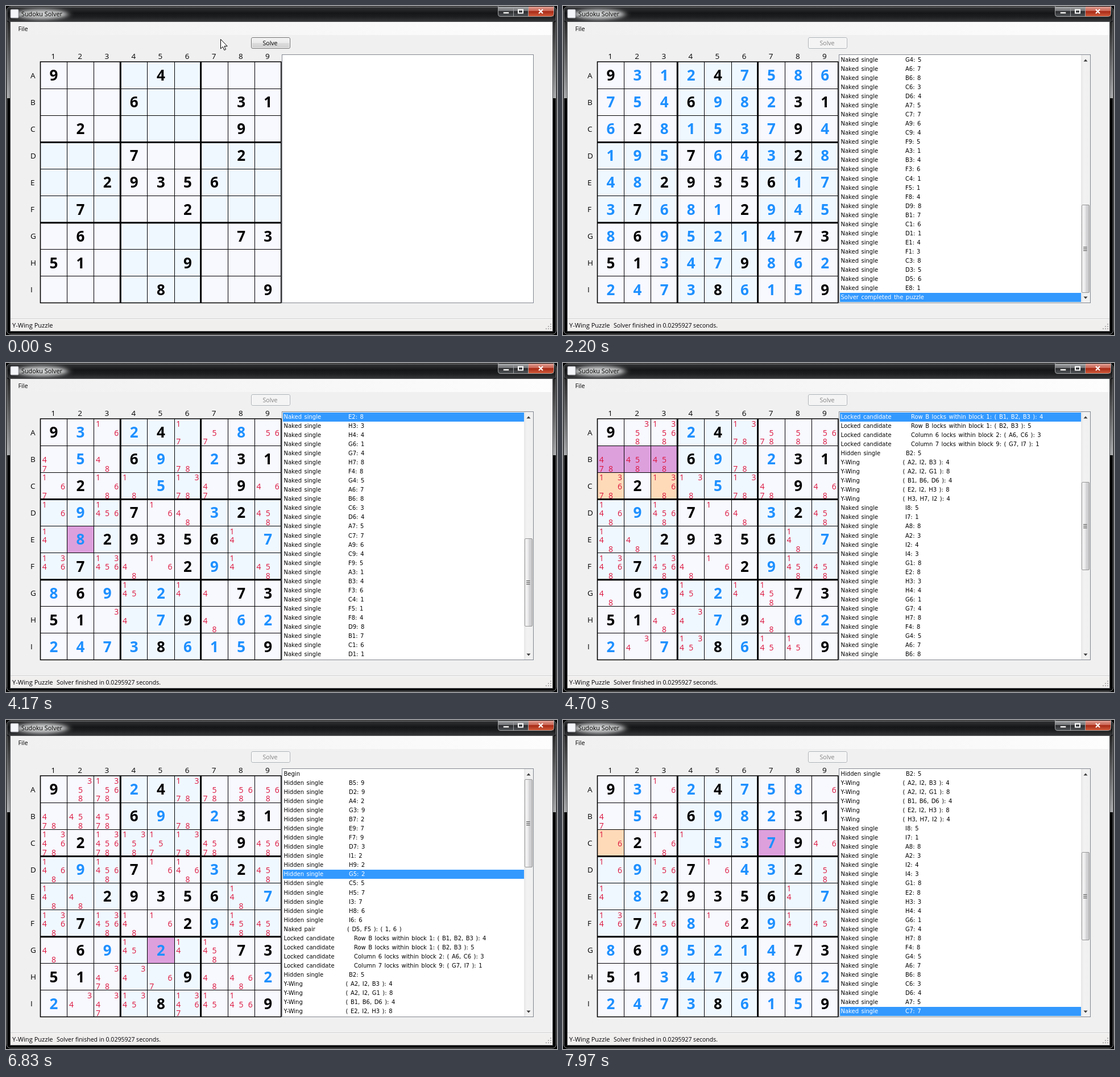
Write an HTML page that moves like this. It is 969x578 px and loops after 8 s.

```html
<!DOCTYPE html>
<html lang="en">
<head>
<meta charset="utf-8">
<title>Sudoku Solver</title>
<style>
html, body { margin: 0; width: 100%; height: 100%; overflow: hidden; background: #000; }
svg { display: block; width: 969px; height: 578px; }
text { font-family: "Open Sans", "Noto Sans", sans-serif; white-space: pre; }
.label { font-size: 13.5px; }
.big { font-size: 26px; font-weight: 700; text-anchor: middle; }
.small { font-size: 14px; fill: #dc143c; text-anchor: middle; }
.log { font: 10px "DejaVu Sans", sans-serif; word-spacing: 1.3px; }
</style>
</head>
<body>
<svg viewBox="0 0 969 578">
  <defs>
    <linearGradient id="bar" x2="0" y2="1">
      <stop offset="0" stop-color="#333436"/><stop offset=".4" stop-color="#151617"/>
      <stop offset=".65" stop-color="#1d1e1f"/><stop offset="1" stop-color="#3a3b3d"/>
    </linearGradient>
    <linearGradient id="side" x2="0" y2="1">
      <stop offset="0" stop-color="#2a2a2b"/><stop offset="1" stop-color="#a8a9aa"/>
    </linearGradient>
    <linearGradient id="menu">
      <stop offset="0" stop-color="#f0f0f0"/><stop offset="1" stop-color="#fdfdfd"/>
    </linearGradient>
    <linearGradient id="cap" x2="0" y2="1">
      <stop offset="0" stop-color="#a9abad"/><stop offset=".48" stop-color="#6b6d70"/>
      <stop offset=".5" stop-color="#2a2c2e"/><stop offset="1" stop-color="#505356"/>
    </linearGradient>
    <linearGradient id="close" x2="0" y2="1">
      <stop offset="0" stop-color="#e0a297"/><stop offset=".48" stop-color="#c9604f"/>
      <stop offset=".5" stop-color="#a82a16"/><stop offset="1" stop-color="#cf5a3a"/>
    </linearGradient>
    <linearGradient id="thumb">
      <stop offset="0" stop-color="#f6f6f6"/><stop offset=".48" stop-color="#e9e9eb"/>
      <stop offset=".52" stop-color="#d8d8da"/><stop offset="1" stop-color="#c6c6c9"/>
    </linearGradient>
    <linearGradient id="track">
      <stop offset="0" stop-color="#e6e6e6"/><stop offset=".3" stop-color="#f2f2f2"/><stop offset="1" stop-color="#f0f0f0"/>
    </linearGradient>
    <filter id="soft" x="-30%" y="-100%" width="160%" height="300%"><feGaussianBlur stdDeviation="6 3"/></filter>
    <clipPath id="title"><rect x="2" y="2" width="965" height="25"/></clipPath>
  </defs>
  <g id="frame"></g>
  <g id="cells"></g>
  <g id="grid"></g>
  <g id="list"></g>
  <g id="button"></g>
  <path id="cursor" d="M0 0V16.5L3.8 13 6.4 19 9 17.9 6.5 12.1H11.7Z" fill="#fff" stroke="#000"/>
</svg>
<script>
const $ = id => document.getElementById(id);
const LOOP = 8000, REPEAT = 30.8, ROWS = 27, ROW_H = 16.04;
const X0 = 60.5, Y0 = 98, CELL = 47.1;

const rect = (x, y, w, h, fill, extra = '') =>
  `<rect x="${x}" y="${y}" width="${w}" height="${h}" fill="${fill}" ${extra}/>`;
const text = (x, y, str, extra = '') => `<text x="${x}" y="${y}" ${extra}>${str}</text>`;
const path = (d, stroke, width = 1, extra = '') =>
  `<path d="${d}" fill="none" stroke="${stroke}" stroke-width="${width}" ${extra}/>`;

// ---- solver log -------------------------------------------------------
const singles = (kind, x, list) =>
  list.split(' ').map(s => ({ kind, x, note: `${s.slice(0, 2)}: ${s[2]}`, fills: true }));
const hidden = list => singles('Hidden single', 603, list);
const lock = (line, block, cells, digit) => ({
  kind: 'Locked candidate', x: 612,
  note: `${line} locks within block ${block}: ( ${cells} ): ${digit}`
});
const wing = (cells, digit) => ({ kind: 'Y-Wing', x: 597.5, note: `( ${cells} ): ${digit}` });

const steps = [
  { kind: 'Begin' },
  ...hidden('B59 D29 A42 G39 B72 E97 F79 D73 I12 H92 G52 C55 H57 I37 H86 I66'),
  { kind: 'Naked pair', x: 600, note: '( D5, F5 ): ( 1, 6 )' },
  lock('Row B', 1, 'B1, B2, B3', 4),
  lock('Row B', 1, 'B2, B3', 5),
  lock('Column 6', 2, 'A6, C6', 3),
  lock('Column 7', 9, 'G7, I7', 1),
  ...hidden('B25'),
  wing('A2, I2, B3', 4),
  wing('A2, I2, G1', 8),
  wing('B1, B6, D6', 4),
  wing('E2, I2, H3', 8),
  wing('H3, H7, I2', 4),
  ...singles('Naked single', 602,
    'I85 I71 A88 A23 I24 I43 G18 E28 H33 H44 G61 G74 H78 F48 G45 A67 B68 C63 D64 A75 ' +
    'C77 A96 C94 F95 A31 B34 F36 C41 F51 F84 D98 B17 C16 D11 E14 F13 C38 D35 D56 E81'),
  { kind: 'Solver completed the puzzle' }
];

// ---- board states, one per log row -----------------------------------
const givens = ('9...4.......6...31.2.....9....7...2...29356..' +
  '.7...2....6.....7351...9.......8...9').split('').map(c => +c || 0);
const row = i => Math.floor(i / 9), col = i => i % 9;
const block = i => 3 * Math.floor(row(i) / 3) + Math.floor(col(i) / 3);
const sees = (a, b) => a !== b && (row(a) === row(b) || col(a) === col(b) || block(a) === block(b));
const all = givens.map((_, i) => i);

const states = [];
let values = givens;
let marks = all.map(i => [1, 2, 3, 4, 5, 6, 7, 8, 9].filter(d => !all.some(j => givens[j] === d && sees(i, j))));
for (const { note, fills } of steps) {
  let named = [], lost = [];
  if (note) {
    named = note.match(/[A-I]\d/g).map(s => (s.charCodeAt(0) - 65) * 9 + +s[1] - 1);
    const digits = note.split(': ').pop().match(/\d/g).map(Number);
    values = values.slice();
    if (fills) values[named[0]] = digits[0];
    const before = marks;
    marks = before.map((set, i) => set.filter(d => !(digits.includes(d) &&
      named.filter(n => before[n].includes(d)).every(n => sees(i, n)))));
    lost = all.filter(i => !values[i] && marks[i].length < before[i].length);
  }
  states.push({ values, marks, named, lost });
}

// ---- static parts -----------------------------------------------------
function drawFrame() {
  let s = rect(0, 0, 969, 578, '#000') +
    rect(1.5, 1.5, 966, 575, '#050506', 'rx="6" stroke="#8f9193"') +
    rect(2, 2, 965, 26, 'url(#bar)', 'rx="5"') +
    rect(2, 28, 5, 134, 'url(#side)') + rect(962, 28, 5, 134, 'url(#side)') +
    '<g clip-path="url(#title)"><ellipse cx="63" cy="14.5" rx="46" ry="9" fill="#c9cacb" filter="url(#soft)"/></g>' +
    rect(8, 6, 14, 15, '#f4f5f8', 'rx="1.5" stroke="#9a9da4"') +
    text(27, 18, 'Sudoku Solver', 'font-size="10.8"');

  s += rect(866, 1, 52, 17, 'url(#cap)') + rect(918, 1, 45, 17, 'url(#close)') +
    path('M865.5 0V14Q865.5 18.5 870 18.5H958Q963.5 18.5 963.5 13V0M892.5 1V18M918.5 1V18', '#a0a2a4') +
    rect(874.5, 10.5, 10, 3, '#fff', 'stroke="#444" stroke-width=".7"') +
    path('M901 6.5H909V12.5H901Z', '#fff', 2) +
    path('M937 6L944 13M944 6L937 13', '#fff', 2.2);

  s += rect(7.5, 27.5, 954, 544, '#f0f0f0', 'stroke="#4c4e50"') +
    rect(8, 28, 953, 23, 'url(#menu)') +
    text(21.5, 43.5, 'File', 'font-size="10.8"') +
    rect(8, 549, 953, 22, '#f1eeee') + path('M8 549.5H961', '#cdcdcd') + path('M8 550.5H961', '#fff') +
    text(11, 565, 'Y-Wing Puzzle', 'font-size="11.1"') +
    `<g id="done">${text(89, 565, 'Solver finished in 0.0295927 seconds.', 'font-size="10.5"')}</g>`;
  for (let r = 0; r < 3; r++)
    for (let c = 2 - r; c < 3; c++) s += rect(949 + 4 * c, 558 + 4 * r, 2, 2, '#b3b1b1');

  for (let i = 0; i < 9; i++) {
    s += text(X0 + CELL * (i + .5) - 1, 93, i + 1, 'class="label" text-anchor="middle"') +
      text(43, 126.5 + CELL * i, 'ABCDEFGHI'[i], 'class="label"');
  }
  $('frame').innerHTML = s + rect(485.5, 85.5, 442, 436, '#fff', 'stroke="#828790"');

  let thin = '', thick = '';
  const cross = (x, y) => `M${x} 98V521M60 ${y}H484`;
  for (let i = 1; i < 9; i++) {
    if (i % 3) thin += cross(Math.floor(X0 + CELL * i) + .5, Math.floor(Y0 + CELL * i) + .5);
    else thick += cross(60 + CELL * i, Y0 + CELL * i + .2);
  }
  $('grid').innerHTML = path(thin, '#000') + path(thick, '#000', 3) +
    path('M60.5 98H483.8V521.5H60.5Z', '#000', 1.6);
}

// ---- changing parts ---------------------------------------------------
function drawCells(k) {
  const state = k < 0 ? { values: givens, named: [], lost: [] } : states[k];
  let s = '';
  for (const i of all) {
    const x = X0 + CELL * col(i), y = Y0 + CELL * row(i);
    const fill = state.named.includes(i) ? '#dda0dd' : state.lost.includes(i) ? '#ffdab9'
      : block(i) % 2 ? '#f0f8ff' : '#f8f8ff';
    s += rect(x, y, CELL, CELL, fill, 'shape-rendering="crispEdges"');
    if (state.values[i]) {
      s += text(x + 23.4, y + 33, state.values[i], `class="big" fill="${givens[i] ? '#000' : '#1e90ff'}"`);
    } else if (state.marks) {
      for (const d of state.marks[i])
        s += text(x + 7.3 + 16.1 * ((d - 1) % 3), y + 14.2 + 15.6 * Math.floor((d - 1) / 3), d, 'class="small"');
    }
  }
  $('cells').innerHTML = s;
}

function drawList(k, top) {
  if (k < 0) return $('list').innerHTML = '';
  let s = '';
  for (let r = 0; r < ROWS; r++) {
    const { kind, x, note } = steps[top + r], y = Math.round(87 + ROW_H * r), on = top + r === k;
    const style = `class="log" fill="${on ? '#fff' : '#000'}"`;
    if (on) s += rect(487, y, 424, 16, '#3399ff');
    s += text(488.5, y + 11.3, kind, style);
    if (note) s += text(x, y + 11.3, note, style);
  }
  const y = 104.5 + Math.round(5.833 * top);
  s += rect(911, 86, 16, 435, 'url(#track)') +
    '<path d="M915.5 97.5L919 93.5 922.5 97.5ZM915.5 510.5L919 514.5 922.5 510.5Z" fill="#3c3c3c"/>' +
    rect(912.5, y, 13, 154, 'url(#thumb)', 'rx="1.5" stroke="#979797"');
  for (let i = -1; i < 2; i++) s += rect(915, y + 76.5 + 3 * i, 6.5, 1.3, '#666');
  $('list').innerHTML = s;
}

const looks = {
  normal: ['#707070', '#f2f2f2', '#ebebeb', '#dddddd', '#cfcfcf', '#000'],
  hover: ['#3c7fb1', '#eaf6fd', '#d9f0fc', '#bee6fd', '#a7d9f5', '#000'],
  pressed: ['#2c628b', '#e5f4fc', '#c4e5f6', '#98d1ef', '#68b3db', '#000'],
  fading: ['#8faabb', '#f0f5f8', '#e8f0f5', '#deeaf1', '#d6e5ed', '#666'],
  disabled: ['#adb2b5', '#f4f4f4', '#f4f4f4', '#f4f4f4', '#f4f4f4', '#838383']
};
function drawButton(look) {
  const [edge, a, b, c, d, ink] = looks[look];
  const stop = (at, color) => `<stop offset="${at}" stop-color="${color}"/>`;
  $('button').innerHTML =
    `<linearGradient id="face" x2="0" y2="1">${stop(0, a)}${stop(.5, b)}${stop(.5, c)}${stop(1, d)}</linearGradient>` +
    rect(431.5, 55.5, 68, 19, 'url(#face)', `rx="2.5" stroke="${edge}"`) +
    rect(432.5, 56.5, 66, 17, 'none', 'rx="1.5" stroke="#fff" stroke-opacity=".7"') +
    text(464.5, 69, 'Solve', `font-size="10.6" text-anchor="middle" fill="${ink}"`);
}

// ---- timeline -----------------------------------------------------------
function selected(t) {
  if (t < 1595) return -1;
  if (t < 2725) return 68;
  if (t < 3195) return 67;
  if (t < 6060) return Math.max(0, 66 - Math.floor((t - 3200) / REPEAT));
  if (t < 6560) return 1;
  return 2 + Math.floor((t - 6566.7) / REPEAT + .7);
}

function pointer(t) {
  if (t < 2095) {
    const p = Math.min(1, Math.max(0, (t - 633) / 567)), e = p * p * (3 - 2 * p);
    return [377 + 66 * e, 58 + 6.5 * e];
  }
  const n = Math.round((t - 2066.7) / 33.33);
  return n < 4 ? [443 + 24.5 * n, 64.5 - 10.3 * n] : null;
}

let shown = '';
function render(time) {
  const t = Math.floor((time + 3.4) * .03) * 100 / 3;
  const k = selected(t), top = t < 6060 ? Math.min(42, k) : Math.max(0, k - 26);
  const tip = pointer(t);
  const look = t >= 1625 ? 'disabled' : t >= 1595 ? 'fading' : t >= 1460 ? 'pressed'
    : tip[0] >= 431 ? 'hover' : 'normal';

  $('cursor').style.display = tip ? '' : 'none';
  if (tip) $('cursor').setAttribute('transform', `translate(${Math.round(tip[0]) + .5} ${Math.round(tip[1]) + .5})`);

  const key = [k, top, look].join();
  if (key === shown) return;
  shown = key;
  $('done').style.display = k < 0 ? 'none' : '';
  drawCells(k);
  drawList(k, top);
  drawButton(look);
}

drawFrame();
const start = performance.now();
function tick() {
  render((performance.now() - start) % LOOP);
  requestAnimationFrame(tick);
}
tick();
</script>
</body>
</html>
```
